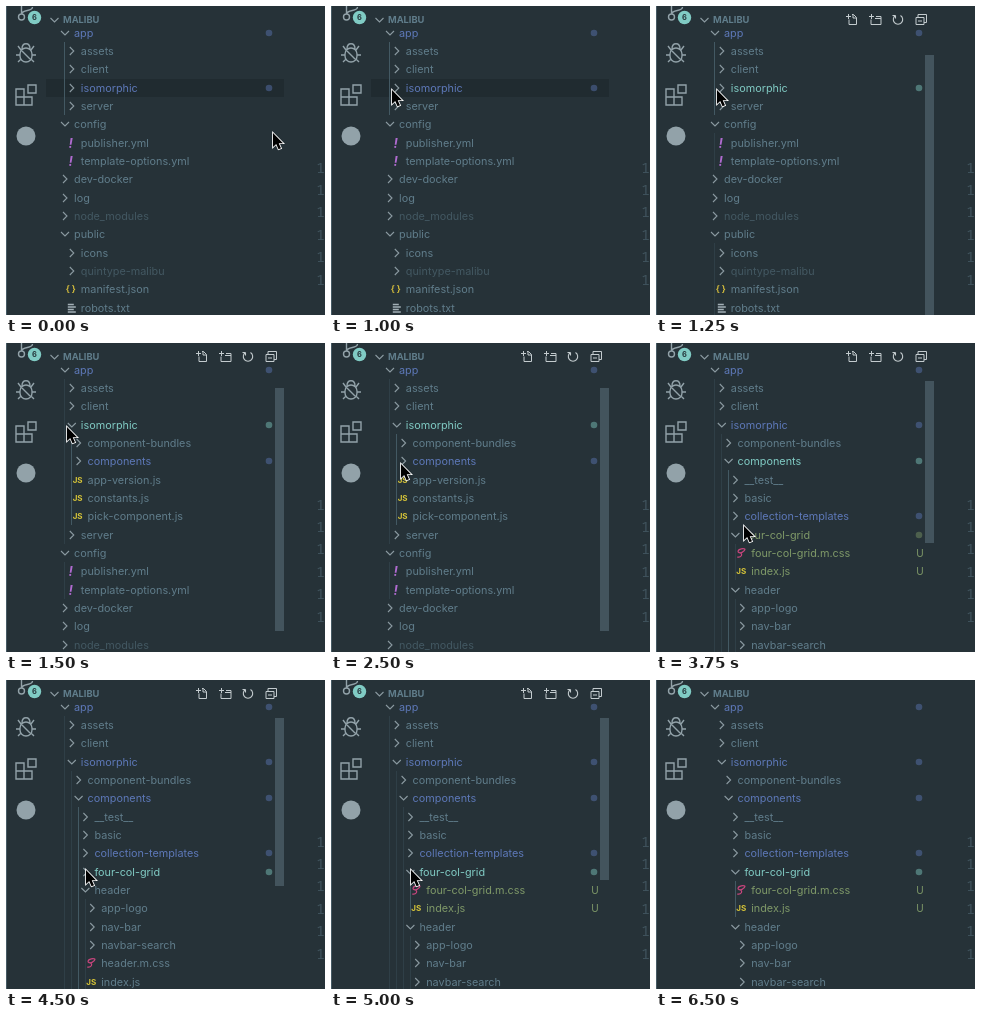
These frames come from a looping animation (319x309 px, 7.25 s). An HTML page with a canvas:

```html
<!DOCTYPE html>
<html lang="en">
<head>
<meta charset="utf-8">
<title>File explorer</title>
<style>
  html, body { margin: 0; width: 100%; height: 100%; overflow: hidden; background: #263238; }
  canvas { display: block; width: 319px; height: 309px; }
</style>
</head>
<body>
<canvas id="stage"></canvas>
<script>
const W = 319, H = 309, LOOP = 7250;
const ROW = 55 / 3, FIRST_ROW = 27, INDENT = 6.8;
const UI = 'Inter, "Open Sans", sans-serif';
const COLOR = {
  bg: '#263238', text: '#607d8b', modified: '#5d78b8', untracked: '#7f9968',
  ignored: '#435862', active: '#80cbc4', chevron: '#8b9aa1', icon: '#92a2a9',
  guide: '#435963', faintGuide: '#2f3f47', thumb: '#43545d', row: '#202b30',
  edge: '#465a64', lineNumber: '#40535d', action: '#c3cbce'
};

const canvas = document.getElementById('stage');
const dpr = window.devicePixelRatio || 1;
canvas.width = W * dpr;
canvas.height = H * dpr;
const ctx = canvas.getContext('2d');

const dir = (name, kids = [], git = 'text') => ({ name, kids, git });
const file = (name, icon, git = 'text') => ({ name, icon, git });

const tree = [
  dir('app', [
    dir('assets'),
    dir('client'),
    dir('isomorphic', [
      dir('component-bundles'),
      dir('components', [
        dir('__test__'),
        dir('basic'),
        dir('collection-templates', [], 'modified'),
        dir('four-col-grid', [
          file('four-col-grid.m.css', 'css', 'untracked'),
          file('index.js', 'js', 'untracked')
        ], 'untracked'),
        dir('header', [
          dir('app-logo'), dir('nav-bar'), dir('navbar-search'),
          file('header.m.css', 'css'), file('index.js', 'js')
        ])
      ], 'modified'),
      file('app-version.js', 'js'),
      file('constants.js', 'js'),
      file('pick-component.js', 'js')
    ], 'modified'),
    dir('server')
  ], 'modified'),
  dir('config', [file('publisher.yml', 'yml'), file('template-options.yml', 'yml')]),
  dir('dev-docker'),
  dir('log'),
  dir('node_modules', [], 'ignored'),
  dir('public', [
    dir('icons'),
    dir('quintype-malibu', [], 'ignored'),
    file('manifest.json', 'json'),
    file('robots.txt', 'txt')
  ])
];

const base = ['app', 'config', 'public'];
const inner = [...base, 'isomorphic', 'components', 'header'];
const full = [...inner, 'four-col-grid'];

const stages = [
  { at: 0, open: base, active: 'isomorphic', guide: 'app', blurred: true },
  { at: 1250, open: base, active: 'isomorphic', guide: 'app', hover: true, thumb: [49, 320] },
  { at: 1500, open: [...base, 'isomorphic'], active: 'isomorphic', guide: 'isomorphic', hover: true, thumb: [45, 288] },
  { at: 2750, open: full, active: 'components', guide: 'components', hover: true, thumb: [38, 200] },
  { at: 4500, open: inner, active: 'four-col-grid', guide: 'components', hover: true, thumb: [38, 206] },
  { at: 5000, open: full, active: 'four-col-grid', guide: 'four-col-grid', hover: true, thumb: [38, 200] },
  { at: 6250, open: full, active: 'four-col-grid', guide: 'four-col-grid', thumb: [38, 200], fade: 0.25 },
  { at: 6500, open: full, active: 'four-col-grid', guide: 'four-col-grid' }
];

// Pointer positions, each held until the next.
const pointer = [
  { at: 0, x: 267, y: 127 }, { at: 250, x: 66, y: 36 }, { at: 750, x: 66, y: 85 },
  { at: 1000, x: 61, y: 84 }, { at: 2250, x: 71, y: 122 }, { at: 2500, x: 70, y: 121 },
  { at: 3750, x: 88, y: 183 }, { at: 4000, x: 88, y: 188 }, { at: 4250, x: 80, y: 190 },
  { at: 6000, x: 78, y: 190 }, { at: 6250, hidden: true }
];

const current = (list, t) => list.filter(item => item.at <= t).pop();
const rowY = index => Math.floor(FIRST_ROW + index * ROW + 0.01);

function flatten(nodes, open, level = 0, rows = []) {
  for (const node of nodes) {
    const row = { node, level, index: rows.length };
    rows.push(row);
    row.open = !!node.kids && open.includes(node.name);
    if (row.open) flatten(node.kids, open, level + 1, rows);
    row.last = rows.length - 1;
  }
  return rows;
}

function text(str, x, y, color, font = `10.85px ${UI}`, align = 'left') {
  ctx.font = font;
  ctx.fillStyle = color;
  ctx.textAlign = align;
  ctx.textBaseline = 'alphabetic';
  ctx.fillText(str, x, y);
}

function path(d, x, y, color, width = 1.4) {
  ctx.save();
  ctx.translate(x, y);
  ctx.strokeStyle = color;
  ctx.lineWidth = width;
  ctx.stroke(new Path2D(d));
  ctx.restore();
}

function disc(x, y, r, color) {
  ctx.beginPath();
  ctx.arc(x, y, r, 0, Math.PI * 2);
  ctx.fillStyle = color;
  ctx.fill();
}

function chevron(x, y, open) {
  const d = open ? 'M-4 -2L0 2L4 -2' : 'M-2 -4L2 0L-2 4';
  path(d, x, y, COLOR.chevron, 1.1);
}

const fileIcons = {
  js: (x, y) => text('JS', x, y + 3, '#d9c738', `bold 8px ${UI}`, 'center'),
  yml: (x, y) => text('!', x, y + 4.5, '#b06bd0', `italic bold 13px ${UI}`, 'center'),
  json: (x, y) => text('{ }', x, y + 3, '#d4bd3c', `bold 8.5px ${UI}`, 'center'),
  css: (x, y) => path('M4 -4C0 -5 -4 -3 -3 -1C-1 1 3 -1 4 -4M-1 0C2 1 0 5 -4 4', x, y, '#c8457d', 1.2),
  txt: (x, y) => path('M-4 -3.5H2M-4 -1H4M-4 1.5H2M-4 4H4', x + 1, y, '#a3b0b6', 1.3)
};

function drawActivityBar() {
  const c = COLOR.icon;
  ctx.fillStyle = COLOR.edge;
  ctx.fillRect(0, 0, 1, H);

  path('M-5 -10V4M-5 4A3 3 0 1 0 -5 10A3 3 0 1 0 -5 4M6 -3C6 2 -4 -1 -5 4', 20.5, 4, c);
  disc(28.5, 11.5, 6.7, COLOR.active);
  text('6', 28.5, 14.3, '#26383d', `bold 7.5px ${UI}`, 'center');

  path('M-4 -4C-4 -11 4 -11 4 -4M-6 1A6 6 0 0 1 6 1V3A6 6 0 0 1 -6 3Z' +
       'M-5 -3L-8 -7M5 -3L8 -7M-6 2H-10M6 2H10M-5 6L-8 9M5 6L8 9M-4 -2L4 6', 20, 47, c);
  path('M-10 -6H-2V2H6V10H-10ZM-10 2H-2V10M2 -10H10V-2H2Z', 20, 89, c);
  disc(20, 130, 9.5, c);
}

function drawActions() {
  const c = COLOR.action;
  path('M0 -5H1.5L4.5 -2V5H-3V0M1 -5V-1.5H4.5M-6 -3H-1M-3.5 -5.5V-0.5', 196, 13.5, c, 1);
  path('M-4 0V5H6V-3H1M-6 -3H-1M-3.5 -5.5V-0.5M0 -1H6', 219, 13.5, c, 1);
  path('M-2.5 -4A4.7 4.7 0 1 0 2.5 -4M-2.5 -4H-5.5M-2.5 -4V-1', 242, 13.5, c, 1.1);
  path('M-5 -2H3V5H-5ZM-3 -2V-5H5.5V3H3M-3 1.5H1', 265, 13.5, c, 1);
}

function drawGuides(rows, stage) {
  for (const row of rows) {
    const active = row.node.name === stage.guide;
    if (!row.open || !(active || stage.hover)) continue;
    const x = Math.round(58.4 + row.level * INDENT);
    const top = rowY(row.index) + 9;
    const bottom = rowY(row.last) + 9;
    ctx.fillStyle = active ? COLOR.guide : COLOR.faintGuide;
    ctx.fillRect(x, top, 1, bottom - top);
  }
}

function drawRow(row, stage) {
  const { node, level } = row;
  const y = rowY(row.index);
  if (y > H + ROW) return;
  const selected = node.name === stage.active;
  const color = selected && !stage.blurred ? COLOR.active : COLOR[node.git];
  const x = 68 + level * INDENT;

  if (node.kids) chevron(x - 9, y, row.open);
  else fileIcons[node.icon](x - 10, y);
  text(node.name, x, y + 4, color);

  if (node.git !== 'modified' && node.git !== 'untracked') return;
  if (node.kids) {
    ctx.globalAlpha = 0.45;
    disc(263, y, 3.3, color);
    ctx.globalAlpha = 1;
  } else {
    text('U', 264, y + 4, color, `10px ${UI}`, 'center');
  }
}

function drawPointer({ x, y, hidden }) {
  if (hidden) return;
  const shape = new Path2D('M0 0V14L3.2 11L5.5 16.2L8 15.2L5.7 10.2H10Z');
  ctx.save();
  ctx.translate(x, y);
  ctx.strokeStyle = '#fff';
  ctx.lineWidth = 1.7;
  ctx.stroke(shape);
  ctx.fillStyle = '#000';
  ctx.fill(shape);
  ctx.restore();
}

function draw(t) {
  const stage = current(stages, t);
  const rows = flatten(tree, stage.open);
  ctx.setTransform(dpr, 0, 0, dpr, 0, 0);
  ctx.fillStyle = COLOR.bg;
  ctx.fillRect(0, 0, W, H);

  drawActivityBar();
  if (stage.blurred) {
    const selected = rows.find(row => row.node.name === stage.active);
    ctx.fillStyle = COLOR.row;
    ctx.fillRect(40, rowY(selected.index) - 9, 238, 18);
  }
  chevron(48.5, 14, true);
  text('MALIBU', 57, 16.5, COLOR.text, `bold 9.3px ${UI}`);
  if (stage.hover) drawActions();

  drawGuides(rows, stage);
  rows.forEach(row => drawRow(row, stage));

  for (let i = 0; i < 6; i++) {
    text('1', 310, 166.5 + i * 22.4, COLOR.lineNumber, '15px "Noto Sans Mono", monospace');
  }
  if (stage.thumb) {
    const [top, bottom] = stage.thumb;
    ctx.globalAlpha = stage.fade || 1;
    ctx.fillStyle = COLOR.thumb;
    ctx.fillRect(269, top, 9, bottom - top);
    ctx.globalAlpha = 1;
  }
  drawPointer(current(pointer, t));
}

const start = performance.now();
function tick() {
  draw((performance.now() - start) % LOOP);
  requestAnimationFrame(tick);
}
tick();
</script>
</body>
</html>
```
